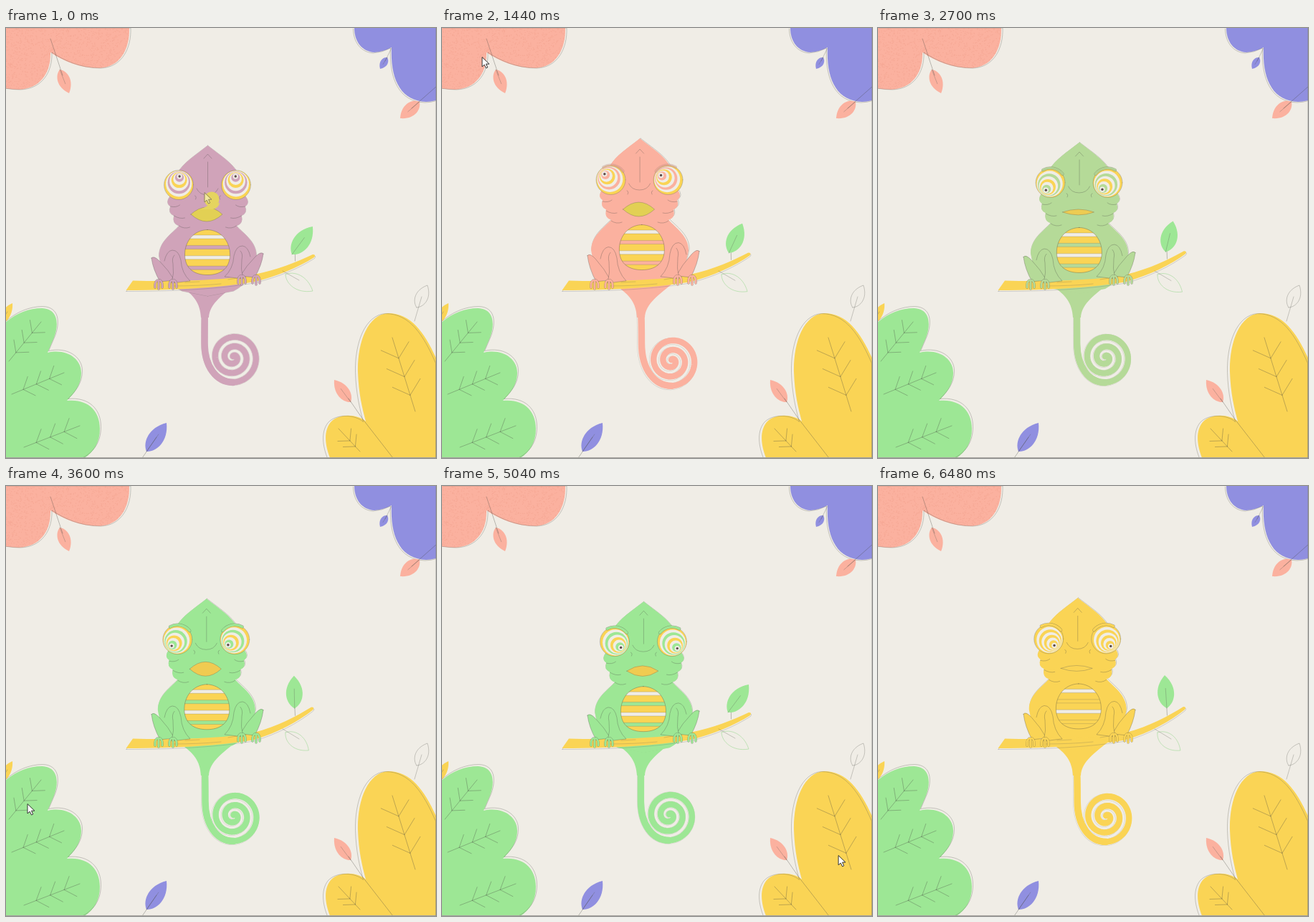
Write an HTML page with a canvas that moves like this. It is 600x600 px and loops after 6580 ms.

```html
<!DOCTYPE html>
<html lang="en">
<head>
<meta charset="utf-8">
<title>Chameleon</title>
<style>
html, body { margin: 0; width: 100%; height: 100%; overflow: hidden; background: #f0ede6; }
canvas { display: block; width: 600px; height: 600px; }
</style>
</head>
<body>
<canvas id="stage" width="600" height="600"></canvas>
<script>
const ctx = document.getElementById('stage').getContext('2d');
const LOOP = 6580, STEP = 90;
const PAPER = '#f0ede6', CORAL = '#fbb19f', PURPLE = '#908fe0', GREEN = '#9de795', YELLOW = '#fad455';
const INK = 'rgba(70,70,65,.42)', FAINT = 'rgba(90,90,85,.38)';

const clamp = v => Math.max(0, Math.min(1, v));
const mix = (a, b, k) => a + (b - a) * k;
function blend(a, b, k) {
  const channel = (c, i) => parseInt(c.slice(i, i + 2), 16);
  return '#' + [1, 3, 5].map(i =>
    Math.round(mix(channel(a, i), channel(b, i), k)).toString(16).padStart(2, '0')).join('');
}

// Stops of the pointer: [time, x, y]; it leaves the stage below twice.
const STOPS = [[-120, 290, -300], [0, 277, 230], [400, 4, 60], [630, 56, 37], [1440, 56, 41],
  [2160, 14, 480], [2250, 4, 605], [2880, 4, 605], [2970, 4, 470], [3600, 30, 444], [4320, 36, 448],
  [4500, 538, 477], [5250, 559, 531], [5670, 553, 478], [6210, 575, 605]];
function pointerAt(t) {
  const i = STOPS.findIndex(s => s[0] >= t);
  if (i <= 0) return STOPS[i < 0 ? STOPS.length - 1 : 0].slice(1);
  const [a, b] = [STOPS[i - 1], STOPS[i]], k = (t - a[0]) / (b[0] - a[0]);
  return [mix(a[1], b[1], k), mix(a[2], b[2], k)];
}

function fill(path, color) { ctx.fillStyle = color; ctx.fill(path); }
function stroke(path, color = INK, width = .8) {
  ctx.strokeStyle = color;
  ctx.lineWidth = width;
  ctx.stroke(path);
}
const line = (...p) => new Path2D('M' + p.join(' '));
function at(x, y, draw) { ctx.save(); ctx.translate(x, y); draw(); ctx.restore(); }
function circle(x, y, r) {
  const p = new Path2D();
  p.arc(x, y, r, 0, 7);
  return p;
}

// Pointed leaf from base (x1, y1) to tip (x2, y2).
function leafPath(x1, y1, x2, y2, w) {
  const dx = x2 - x1, dy = y2 - y1, len = Math.hypot(dx, dy), nx = -dy / len * w, ny = dx / len * w;
  const c = (k, s) => `${x1 + dx * k + nx * s} ${y1 + dy * k + ny * s}`;
  return new Path2D(`M${x1} ${y1}C${c(.15, .62)} ${c(.6, .9)} ${x2} ${y2}C${c(.6, -.9)} ${c(.15, -.62)} ${x1} ${y1}`);
}
function leaf(color, x1, y1, x2, y2, w) {
  fill(leafPath(x1, y1, x2, y2, w), color);
  stroke(line(x1, y1, mix(x1, x2, .6), mix(y1, y2, .6)), FAINT);
}
function vein(x1, y1, x2, y2, size, twigs = 3) {
  const a = Math.atan2(y2 - y1, x2 - x1);
  stroke(line(x1, y1, x2, y2));
  for (let i = 0; i < twigs; i++) {
    const k = .22 + .25 * i, x = mix(x1, x2, k), y = mix(y1, y2, k);
    for (const s of [-.85, .85])
      stroke(line(x, y, x + size * Math.cos(a + s), y + size * Math.sin(a + s)));
  }
}

const bushes = [
  [CORAL, 2, 0, 'M0 0H172C173 28 160 55 130 56C103 56 80 46 62 34C63 62 48 85 18 86Q8 86 -4 84V0'],
  [PURPLE, -1.5, 1, 'M486 0C486 19 497 33 514 34Q527 33 538 27C536 70 550 102 586 103Q594 103 604 100V0'],
  [GREEN, 1.5, -2.5, 'M-3 413C12 399 31 391 50 391C73 392 74 413 67 432L58 453C84 447 105 461 105 481C105 499 94 511 85 520C114 517 131 534 131 559C131 580 121 594 106 602H-3Z'],
  [YELLOW, -3.5, .5, 'M603 467C586 428 567 398 533 398C504 400 490 440 491 480C492 510 497 530 502 549C491 539 465 537 453 550C441 565 447 588 453 602H603Z']
].map(([color, dx, dy, d]) => ({ color, dx, dy, path: new Path2D(d) }));

const grain = new Path2D();
let seed = 7;
const random = () => (seed = seed * 16807 % 2147483647) / 2147483647;
for (let i = 0; i < 1500; i++) grain.rect(random() * 174, random() * 88, 1.2, 1.2);

function scenery() {
  ctx.fillStyle = PAPER;
  ctx.fillRect(0, 0, 600, 600);
  leaf(YELLOW, -9, 414, 9, 384, 11);
  for (const b of bushes) {
    fill(b.path, b.color);
    at(b.dx, b.dy, () => stroke(b.path, FAINT));
  }
  ctx.save();
  ctx.clip(bushes[0].path);
  fill(grain, 'rgba(225,135,115,.22)');
  ctx.restore();
  leaf(CORAL, 75, 58, 88, 91, 15);
  stroke(line(62, 15, 79, 66));
  leaf(PURPLE, 532, 41, 522, 57, 9);
  stroke(line(529, 46, 538, 28), FAINT);
  leaf(CORAL, 577, 103, 550, 126, 16);
  stroke(line(566, 112, 600, 82));
  leaf(CORAL, 481, 522, 458, 491, 15);
  stroke(line(478, 517, 498, 546, 540, 600));
  leaf(PURPLE, 196, 591, 224, 551, 19);
  stroke(line(190, 600, 210, 571));
  stroke(leafPath(573, 390, 588, 359, 15), FAINT);
  stroke(line(580, 375, 570, 409), FAINT);
  vein(4, 465, 49, 410, 18);
  vein(8, 511, 81, 481, 19);
  vein(25, 585, 103, 555, 20);
  vein(571, 535, 539, 432, 27);
  vein(494, 591, 464, 559, 17, 2);
  ctx.fillStyle = '#a3a19c';
  ctx.fillRect(0, 599, 600, 1);
  ctx.fillStyle = 'rgba(120,120,115,.3)';
  ctx.fillRect(599, 0, 1, 600);
}

const half = new Path2D('M0 164C18 178 34 188 42 202L52 234Q60 244 52 249Q56 258 47 262Q50 273 40 276C50 287 68 298 68 318C64 342 54 358 36 367L0 374');
const body = new Path2D();
for (const side of [1, -1]) body.addPath(half, new DOMMatrix([side, 0, 0, 1, 281.5, 0]));
const hips = new Path2D('M243 360C262 372 271 384 272 404H283C284 387 297 376 320 358Z');

function tail(skin, b) {
  const cx = 317 + 3.5 * b ** 4, cy = 459.5 + 5 * b ** 4, x = 277 + 1.5 * b;
  const stem = `M277.500 390Q${x} 410 ${x} 440C${x} ${cy + 12} ${cx - 24} ${cy + 35} ${cx} ${cy + 35}`;
  const curl = new Path2D(stem);
  for (let a = 0; a <= 16; a += .1) {
    const r = 35 - 2.1 * a;
    curl.lineTo(cx + r * Math.sin(a), cy + r * Math.cos(a));
  }
  ctx.lineCap = ctx.lineJoin = 'round';
  at(-1.5 * b, b, () => {
    stroke(curl, 'rgba(90,90,85,.22)', 9.6);
    stroke(curl, PAPER, 8.6);
  });
  stroke(curl, skin, 8.4);
  stroke(new Path2D(stem), skin, 9.4);
  fill(hips, skin);
}

function belly(skin) {
  const egg = new Path2D('M281 281.500C301 282 313 299 312.500 317C312 337 298 344.500 281 344.500C264 344.500 250 337 249.500 317C249 299 261 282 281 281.500Z');
  fill(egg, YELLOW);
  ctx.save();
  ctx.clip(egg);
  for (let i = 0; i < 4; i++) {
    const y = 289 + 14.4 * i, band = new Path2D();
    band.rect(245, y, 72, 5);
    fill(band, i % 2 ? skin : PAPER);
    stroke(band, FAINT, .6);
  }
  ctx.restore();
  stroke(egg);
}

function eye(x, y, skin, look, brow, side) {
  const ball = circle(x, y, 20.5), colors = [YELLOW, PAPER, skin, PAPER];
  ctx.save();
  ctx.clip(ball);
  for (let i = 0; i < 8; i++) {
    const shift = 12 * i / 7;
    fill(circle(x + shift * Math.cos(look), y + shift * Math.sin(look), 20.5 - 2.4 * i), colors[i % 4]);
  }
  ctx.restore();
  fill(circle(x + 12 * Math.cos(look), y + 12 * Math.sin(look), 1.7), '#5b4a4a');
  stroke(ball, FAINT);
  const lid = new Path2D(), mid = -Math.PI / 2 + side * .2;
  lid.arc(x, y + 1, 21.5, mid - .7, mid + .7);
  ctx.globalAlpha = brow;
  stroke(lid, INK, 4.4);
  stroke(lid, skin, 3.4);
  ctx.globalAlpha = 1;
}

function face(look, mood) {
  stroke(new Path2D('M276 182L281.500 176L287 182M281.500 187V222M266 224Q270 233 281 233Q292 233 296 224'), INK, .7);
  for (const side of [-1, 1]) {
    ctx.save();
    ctx.translate(281.5, 0);
    ctx.scale(side, 1);
    stroke(new Path2D('M18 234Q15 235 17 239M52 249Q44 251 39 247M47 262Q39 267 32 265M40 276Q33 281 25 278'), INK, .7);
    ctx.restore();
    const x = 281 + 40 * side;
    eye(x, 219, mood.skin, Math.atan2(look[1] - 215, look[0] - x), mood.brow, -side);
  }
  const h = mood.mouth * 2;
  const lips = new Path2D(`M258 260Q280 ${260 - h} 302 260Q280 ${260 + h} 258 260Z`);
  fill(lips, mood.lips);
  stroke(lips, FAINT);
}

function branch(sway) {
  const x = 431 - 2 * sway, y = 316 - 8 * sway, bend = 2 * sway, rise = 6 * sway;
  const wood = new Path2D(`M167.500 366L177 352.500C230 354 300 353 346 344C380 ${337 - bend} 405 ${327 - rise} ${x - 3} ${y}Q${x + 2} ${y} ${x - 1} ${y + 4}C408 ${334 - rise} 380 ${346 - bend} 345 354.500C300 362 240 366 167.500 366Z`);
  at(.5, 1.5, () => stroke(wood, FAINT, .6));
  fill(wood, YELLOW);
  stroke(new Path2D('M232 360Q270 360 300 357M250 355L270 354M310 351L335 347'), FAINT, .6);
  const bx = 399 + 4 * sway, by = 316 - 6 * sway, tx = 428 - 28 * sway, ty = 277 - 13 * sway;
  stroke(line(403.5, 325 - 5 * sway, mix(bx, tx, .15), mix(by, ty, .15), mix(bx, tx, .5), mix(by, ty, .5)));
  leaf(GREEN, bx, by, tx, ty, 20);
  stroke(leafPath(390, 344, 428 - 6 * sway, 367 + 2 * sway, 17), 'rgba(150,215,140,.65)');
  stroke(line(386, 339, 409, 352 + sway), FAINT);
}

function limbs(skin, b) {
  const thigh = new Path2D('M78 -34Q75 -38 67 -30Q54 -17 46 -3L66 -1Q76 -18 78 -34Z');
  const arm = new Path2D('M60 -30Q57 -44 49 -45Q40 -45 37 -31Q36 -13 24 -2L50 1Q46 -13 48 -26Q50 -34 46 -38');
  for (const side of [-1, 1]) {
    ctx.save();
    ctx.translate(281, side > 0 ? 349 : 355);
    ctx.scale(side, 1);
    ctx.save();
    ctx.scale(1, 1 + .1 * b);
    for (const limb of [thigh, arm]) {
      fill(limb, skin);
      stroke(limb, INK, .7);
    }
    ctx.restore();
    for (const foot of [48, 68]) {
      const toes = new Path2D();
      for (const i of [-1, 0, 1]) {
        toes.moveTo(foot + 2 * i, -3);
        toes.quadraticCurveTo(foot + 6 * i, 0, foot + 5 * i, 9 - 2 * i * i);
      }
      stroke(toes, INK, 3.4);
      stroke(toes, skin, 2.6);
    }
    ctx.restore();
  }
}

function pointer(t) {
  const [x, y] = pointerAt(t), pressed = t < STEP;
  const arrow = new Path2D('M0 0V13L3.200 10.200L5.500 15L7.700 14L5.500 9.200H9.500Z');
  if (pressed) {
    fill(circle(x + 10, y + 9, 10.5), '#e5d45f');
    fill(new Path2D('M272 253L285 246L298 244Q297 251 288 253Z'), '#e5d45f');
  }
  at(x, y, () => {
    fill(arrow, pressed ? '#f1e9a0' : '#fff');
    stroke(arrow, pressed ? '#8d805a' : '#333', 1);
  });
}

// The skin takes on each bush colour in turn; lips and brows go with it.
function moodAt(t) {
  const change = start => clamp((t - start) / 600);
  const green = change(2250), yellow = change(5220);
  const skin = blend(blend(blend(PURPLE, CORAL, change(-360)), GREEN, green), YELLOW, yellow);
  return {
    skin,
    lips: blend(blend('#e2d054', '#f0cb51', green), skin, yellow),
    brow: .4 * change(0) + .6 * green,
    mouth: 10 - 6 * clamp((pointerAt(t)[1] - 450) / 150)
  };
}

function draw(t) {
  const wave = peak => .5 + .5 * Math.cos(2 * Math.PI * (t * 1.026 / 1000 - peak));
  const b = wave(.5), sway = wave(.65) ** 3.7;
  const mood = moodAt(t);
  const dx = -5.5 * b ** 3, dy = -7 * b;
  scenery();
  tail(mood.skin, b);
  at(dx * .4, dy, () => {
    at(dx * .6, 0, () => {
      at(b, -3 * b, () => stroke(body, FAINT, .7));
      at(0, -5.5 * b, () => {
        ctx.scale(1, 1 + .015 * b);
        fill(body, mood.skin);
      });
    });
    belly(mood.skin);
    at(dx * .6, 0, () => face(pointerAt(t - 120), mood));
  });
  branch(sway);
  limbs(mood.skin, b);
  pointer(t);
}

function tick(now) {
  draw(Math.min(Math.floor(now % LOOP / STEP) * STEP, LOOP - 100));
  requestAnimationFrame(tick);
}
draw(0);
requestAnimationFrame(tick);
</script>
</body>
</html>
```
